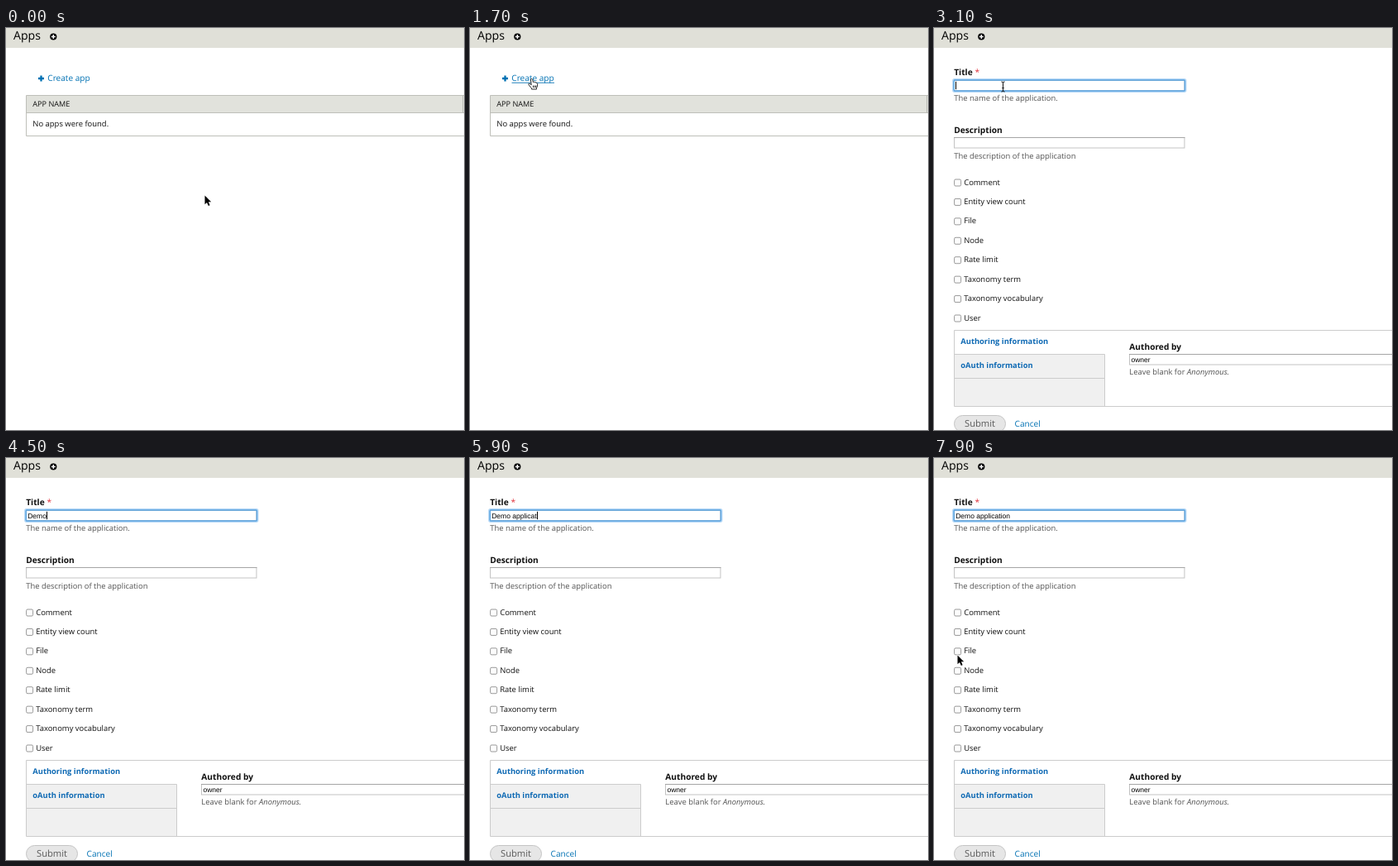
An HTML page that plays this animation: 554 px wide and 486 px high, repeating every 8 s.

```html
<!DOCTYPE html>
<html lang="en">
<head>
<meta charset="utf-8">
<title>Apps</title>
<style>
  html, body { margin: 0; width: 100%; height: 100%; overflow: hidden; background: #fff; }
  svg { display: block; width: 554px; height: 486px; }
  text { font: 9.45px "Open Sans", "Noto Sans", sans-serif; fill: #111; text-rendering: geometricPrecision; white-space: pre; }
  .head { font-size: 14.1px; fill: #000; }
  .caps { font-size: 9.15px; }
  .label { font-size: 10.2px; font-weight: 700; }
  .tab { font-size: 9.35px; font-weight: 700; fill: #0f6ab4; }
  .link { font-size: 10.1px; fill: #0071b3; }
  .note { fill: #555; }
  .button { font-size: 11.2px; fill: #5a5a5a; }
  .value { font: 8.5px "Liberation Sans", Arial, sans-serif; fill: #000; }
  .field { fill: #fff; stroke: #c3c3c3; }
  .line { fill: none; stroke: #bebfb9; }
  .pane { fill: none; stroke: #ccc; }
  .box { fill: #fcfcfc; stroke: #8e8e8e; stroke-width: .9; }
</style>
</head>
<body>
<svg viewBox="0 0 554 486">
  <rect width="554" height="24" fill="#e0e0d8"/>
  <text class="head" x="9" y="13.6">Apps</text>
  <circle cx="57.3" cy="10.5" r="4.1"/>
  <path d="M54.8 10.5h5M57.3 8v5" stroke="#fff" stroke-width="1.4"/>

  <g id="list">
    <path d="M39 61h7M42.5 57.5v7" stroke="#0071b3" stroke-width="2.3"/>
    <text class="link" x="50.3" y="64.4">Create app</text>
    <path id="underline" d="M50.5 66.2h51.5" stroke="#0071b3" stroke-width=".9"/>
    <rect x="24" y="82" width="530" height="20" fill="#e1e2dc"/>
    <path class="line" d="M554 81.5H24.5V130.5H554M24.5 102.5H554M552.5 82v20"/>
    <text class="caps" x="32.3" y="95.2">APP NAME</text>
    <text x="32.3" y="119.2">No apps were found.</text>
  </g>

  <g id="form">
    <text class="label" x="24.2" y="57.4">Title <tspan fill="#e0303a" font-weight="400">*</tspan></text>
    <rect class="field" x="24.5" y="63.5" width="278.5" height="12"/>
    <path d="M24 63.5h279.5" stroke="#a5a5a5"/>
    <g id="focus" fill="none">
      <rect x="23.3" y="62.2" width="281" height="14.6" rx="1.5" stroke="#b5d8f6" stroke-width="2.4"/>
      <rect x="24.2" y="63.1" width="279.2" height="12.8" rx=".8" stroke="#5da5e0" stroke-width="1.5"/>
    </g>
    <text id="typed" class="value" x="26.2" y="72.5"></text>
    <path id="caret" d="M.5 64.8v9.4" stroke="#000"/>
    <text class="note" x="24.2" y="88.2">The name of the application.</text>

    <text class="label" x="24.2" y="127">Description</text>
    <rect class="field" x="24.5" y="132.5" width="278.5" height="12.5"/>
    <path d="M24 132.5h279.5" stroke="#a5a5a5"/>
    <text class="note" x="24.2" y="157.6">The description of the application</text>
    <g id="checks"></g>

    <rect x="24.5" y="394" width="182" height="63.5" fill="#f0f0f0"/>
    <path class="pane" d="M554 365.5H24.5V457.5H554M24.5 394.5H206.5V457.5M24.5 423.5H206.5"/>
    <text class="tab" x="32.3" y="382">Authoring information</text>
    <text class="tab" x="32.3" y="410.8">oAuth information</text>
    <text class="label" x="236.3" y="388.6">Authored by</text>
    <rect class="field" x="236.5" y="394.5" width="330" height="12.5"/>
    <path d="M236 394.5h318" stroke="#a5a5a5"/>
    <text class="value" x="238.5" y="404">owner</text>
    <text class="note" x="236.3" y="419.4">Leave blank for <tspan font-style="italic">Anonymous.</tspan></text>

    <rect x="24.5" y="468.5" width="62" height="20" rx="10" fill="#e6e6e6" stroke="#c4c4c4"/>
    <text class="button" x="37" y="482.2">Submit</text>
    <text class="link" x="97.6" y="482">Cancel</text>
  </g>

  <g id="pointer">
    <path id="arrow" d="M0 0V10.8L2.5 8.4 4.3 12.5 6.1 11.7 4.4 7.8H7.7Z" stroke="#fff" stroke-width="1.2" paint-order="stroke"/>
    <path id="hand" d="M-1.1 .9C-1.1-.4 1-.4 1.2.9L1.8 4C2.5 3.4 3.5 3.5 3.8 4.3 4.6 3.9 5.5 4.2 5.7 5 6.6 4.8 7.2 5.3 7.2 6.2L7 9 6 11V12.5H0L-.3 11-3.5 7.2C-4.3 6-3 5-2 6L-.3 7.3ZM2 8v2.6M3.8 8v2.6M5.4 8v2.6" fill="#fff" stroke="#111" stroke-width=".9"/>
    <path id="beam" d="M-2-6Q0-6 0-5 0-6 2-6M0-5V5M-2 6Q0 6 0 5 0 6 2 6M-1.2 1.5H1.2" fill="none" stroke="#111"/>
  </g>
</svg>
<script>
const LOOP = 8000;
const $ = id => document.getElementById(id);
const show = (id, on) => { $(id).style.display = on ? "" : "none"; };

// [time, shape, x, y]
const pointer = [
  [0, "arrow", 240.5, 202.5], [500, "arrow", 228, 190], [600, "arrow", 192, 156],
  [700, "arrow", 146, 116], [800, "arrow", 106, 86], [900, "arrow", 80, 70],
  [1000, "hand", 69, 61], [1700, "hand", 74.5, 61.5],
  [2700, "beam", 78, 69], [2800, "beam", 81, 70], [2900, "beam", 83.5, 71],
  [4100, "none", 0, 0],
  [6900, "beam", 81, 76], [7000, "beam", 72, 92], [7100, "arrow", 58, 114],
  [7200, "arrow", 44, 142], [7300, "arrow", 33, 170], [7400, "arrow", 26, 194],
  [7500, "arrow", 26, 212], [7600, "arrow", 31, 223], [7700, "arrow", 36, 230],
  [7800, "arrow", 32, 235], [7900, "arrow", 28.5, 238.5]
];

// [time, letters typed]
const phrase = "Demo application";
const typing = [
  [0, 0], [4100, 1], [4300, 2], [4400, 3], [4500, 4], [4600, 5], [4700, 6], [4800, 7],
  [5000, 8], [5200, 9], [5300, 10], [5500, 11], [5600, 12], [5900, 13], [6000, 15], [6200, 16]
];

// [time, visible]
const caret = [[0, 0], [3000, 1], [3600, 0], [4100, 1], [6700, 0], [7200, 1], [7700, 0]];
const focus = [[0, 0], [3000, .6], [3100, 1]];

const at = (steps, t) => steps.findLast(step => step[0] <= t);

const options = ["Comment", "Entity view count", "File", "Node", "Rate limit",
  "Taxonomy term", "Taxonomy vocabulary", "User"];
$("checks").innerHTML = options.map((name, i) => {
  const y = 186.8 + i * 23.43;
  return `<rect class="box" x="24.6" y="${y - 3.8}" width="8" height="8" rx="1.5"/>
    <text x="36.2" y="${y + 2.7}">${name}</text>`;
}).join("");

function draw(t) {
  const onForm = t >= 2100;
  show("list", !onForm);
  show("form", onForm);
  show("underline", t >= 1000);

  const [, shape, x, y] = at(pointer, t);
  for (const id of ["arrow", "hand", "beam"]) show(id, id === shape);
  $("pointer").setAttribute("transform", `translate(${x} ${y})`);

  if (!onForm) return;
  const count = at(typing, t)[1];
  const typed = $("typed");
  typed.textContent = phrase.slice(0, count);
  const end = count ? 26.2 + typed.getComputedTextLength() : 26;
  $("caret").setAttribute("transform", `translate(${Math.round(end)} 0)`);
  show("caret", at(caret, t)[1]);
  $("focus").style.opacity = at(focus, t)[1];
}

const start = performance.now();
function tick() {
  draw((performance.now() - start) % LOOP);
  requestAnimationFrame(tick);
}
tick();
</script>
</body>
</html>
```
